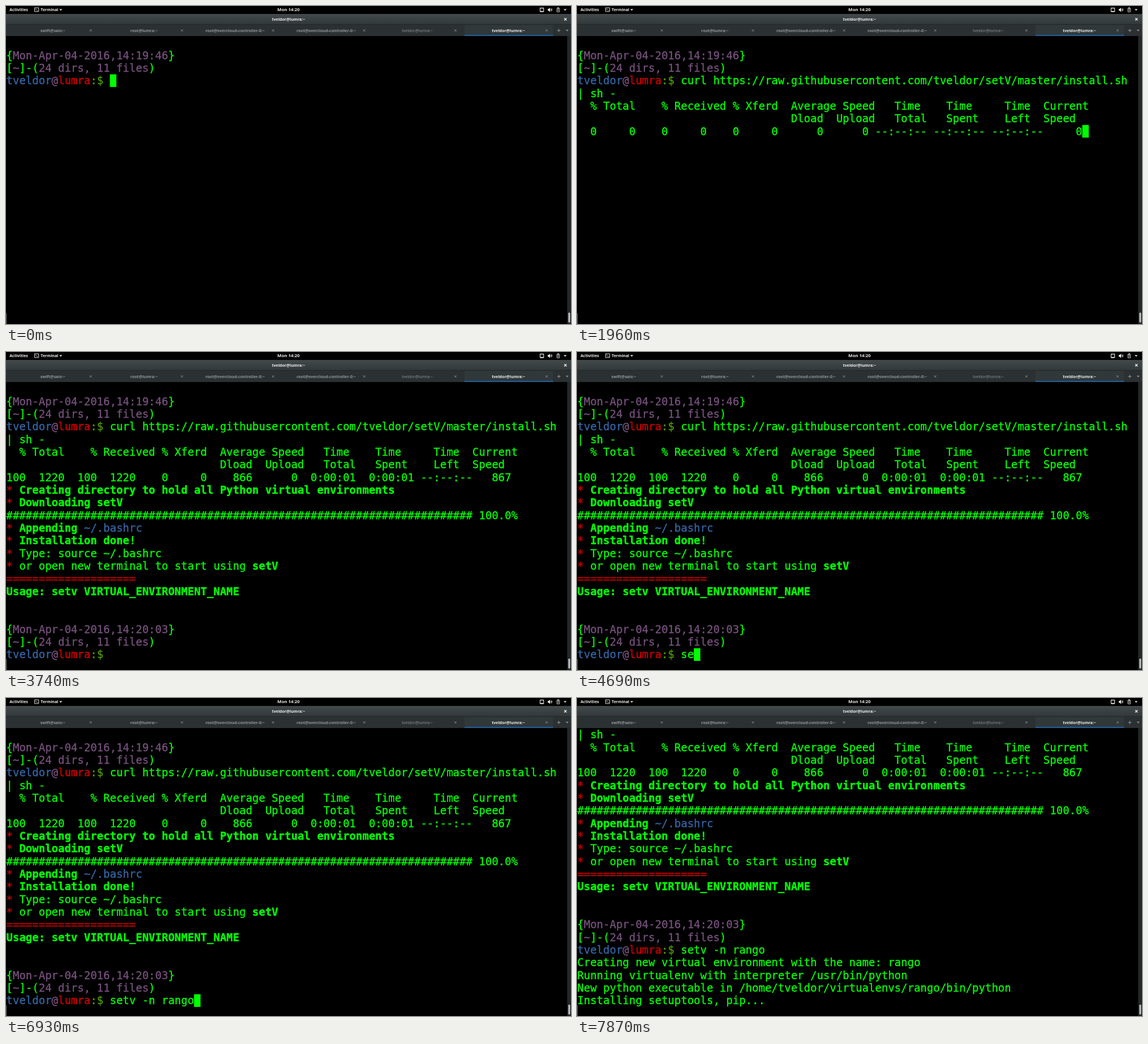
Animation, 998 px wide and 561 px high, one loop 8 s. Source, as an HTML page with a canvas:

```html
<!DOCTYPE html>
<html lang="en">
<head>
<meta charset="utf-8">
<title>Terminal session</title>
<style>
  html, body { margin: 0; width: 100%; height: 100%; overflow: hidden; background: #000; }
  canvas { display: block; }
</style>
</head>
<body>
<canvas id="stage" width="998" height="561"></canvas>
<script>
const ctx = document.getElementById('stage').getContext('2d');

// Layout is in desktop pixels, scaled down to the stage.
const WIDTH = 1920, HEIGHT = 1080;
const SCALE_X = 998 / WIDTH, SCALE_Y = 561 / HEIGHT;
const CELL_W = 22, CELL_H = 43, LEFT = 1, TOP = 103, ROWS = 22, BASELINE = 34;
const LOOP = 8000;
const MONO = '36.54px "DejaVu Sans Mono", monospace';
const UI = '"Open Sans", "Noto Sans", sans-serif';

const USER = 'tveldor', HOST = 'lumra';
const TITLE = `${USER}@${HOST}:~`;

// Inline style codes: ^g green, ^G bold green, ^p purple, ^b blue, ^r red, ^d dark green.
const COLORS = { g: '#00ff00', G: '#00ff00', p: '#75507b', b: '#3465a4', r: '#cc0000', d: '#4e9a06' };

const prompt = time => [
  '',
  `^g{^pMon-Apr-04-2016,${time}^g}`,
  '^g[^p~^g]-(^p24 dirs, 11 files^g)',
  `^b${USER}^p@^r${HOST}^d:$^g `
];
const item = text => '^r*' + text;

const first = prompt('14:19:46');
const command = [
  ...first.slice(0, 3),
  first[3] + `curl https://raw.githubusercontent.com/${USER}/setV/master/install.sh`,
  '| sh -'
];
const header = [
  ...command,
  '  % Total    % Received % Xferd  Average Speed   Time    Time     Time  Current',
  '                                 Dload  Upload   Total   Spent    Left  Speed'
];
const waiting = [
  ...header,
  '  0     0    0     0    0     0      0      0 --:--:-- --:--:-- --:--:--     0'
];
const download = [
  ...header,
  '100  1220  100  1220    0     0    866      0  0:00:01  0:00:01 --:--:--   867',
  item('^G Creating directory to hold all Python virtual environments'),
  item('^G Downloading setV')
];
const installed = [
  ...download,
  '#'.repeat(72) + ' 100.0%',
  item('^G Appending ^b~/.bashrc'),
  item('^G Installation done!'),
  item('^g Type: source ~/.bashrc'),
  item('^g or open new terminal to start using ^GsetV'),
  '^r' + '='.repeat(20),
  '^GUsage: setv VIRTUAL_ENVIRONMENT_NAME',
  '',
  ...prompt('14:20:03')
];
const typed = 'setv -n rango';
const keyTimes = [4450, 4690, 4820, 4930, 5030, 5420, 5690, 5890, 6220, 6470, 6600, 6820, 6930];
const withTyped = n => [...installed.slice(0, -1), installed.at(-1) + typed.slice(0, n)];
const creating = [...withTyped(typed.length), 'Creating new virtual environment with the name: rango'];
const running = [...creating, 'Running virtualenv with interpreter /usr/bin/python'];
const finishing = [
  ...running,
  `New python executable in /home/${USER}/virtualenvs/rango/bin/python`,
  'Installing setuptools, pip...'
];

const screens = [
  [0, first], [50, command], [820, waiting], [2190, [...download, '']], [3500, installed],
  ...keyTimes.map((at, i) => [at, withTyped(i + 1)]),
  [7340, [...creating, '']], [7470, [...running, '']], [7520, finishing]
];
const cursorHidden = [[350, 770], [1360, 1960], [2550, 3150], [3740, 4340], [7870, LOOP]];

function box(x, y, w, h, color) {
  ctx.fillStyle = color;
  ctx.fillRect(x, y, w, h);
}

function label(text, x, y, { color = '#eeeeec', weight = 700, align = 'center', size = 13.5 } = {}) {
  ctx.font = `${weight} ${size}px ${UI}`;
  ctx.textAlign = align;
  ctx.fillStyle = color;
  ctx.fillText(text, x, y);
}

function stroke(color, width, ...paths) {
  ctx.strokeStyle = color;
  ctx.lineWidth = width;
  ctx.beginPath();
  for (const [start, ...rest] of paths) {
    ctx.moveTo(...start);
    rest.forEach(p => ctx.lineTo(...p));
  }
  ctx.stroke();
}

function shape(color, ...points) {
  ctx.fillStyle = color;
  ctx.beginPath();
  points.forEach(p => ctx.lineTo(...p));
  ctx.fill();
}

const cross = (x, y, r, color, width) =>
  stroke(color, width, [[x - r, y - r], [x + r, y + r]], [[x - r, y + r], [x + r, y - r]]);
const arrow = (x, y, color) => shape(color, [x - 5, y - 2.5], [x + 5, y - 2.5], [x, y + 3]);

function drawTopBar() {
  const white = '#eeeeec';
  label('Activities', 12, 18, { align: 'left' });
  ctx.strokeStyle = white;
  ctx.lineWidth = 1.8;
  ctx.strokeRect(97, 6, 14, 13);
  stroke(white, 1.4, [[100, 9], [103, 11.5], [100, 14]], [[104, 15], [108, 15]]);
  label('Terminal', 118, 18, { align: 'left' });
  arrow(186, 13, white);
  label('Mon 14:20', 960, 18, { size: 15 });

  ctx.strokeStyle = white;
  ctx.lineWidth = 2;
  ctx.strokeRect(1815, 7, 12, 12);
  box(1817, 17, 8, 3, white);
  shape(white, [1841, 10], [1844, 10], [1849, 6], [1849, 20], [1844, 16], [1841, 16]);
  for (const r of [4, 7]) {
    ctx.strokeStyle = r === 4 ? white : '#888';
    ctx.beginPath();
    ctx.arc(1849, 13, r, -0.9, 0.9);
    ctx.stroke();
  }
  ctx.strokeStyle = white;
  ctx.lineWidth = 1.6;
  ctx.strokeRect(1872, 8, 9, 12);
  box(1874, 5, 5, 3, white);
  shape(white, [1877, 9], [1874, 14], [1876, 14], [1875, 19], [1879, 13], [1877, 13]);
  arrow(1900, 13, white);
}

function drawWindowFrame() {
  const bar = ctx.createLinearGradient(0, 27, 0, 63);
  bar.addColorStop(0, '#434a4b');
  bar.addColorStop(1, '#32383a');
  box(0, 27, WIDTH, 36, bar);
  label(TITLE, 960, 50);
  cross(1901, 45, 4, '#eeeeec', 2.4);

  box(0, 63, WIDTH, 39, '#2b3133');
  box(0, 62, WIDTH, 1.5, '#222728');
  box(1558, 64, 301, 38, '#31383a');
  box(1558, 98, 301, 4, '#215d9c');
  const remote = 'root@overcloud-controller-0:~';
  const tabs = ['swift@saio:~', `root@${HOST}:~`, remote, remote, TITLE, TITLE];
  tabs.forEach((name, i) => {
    const active = i === 5;
    const color = active ? '#eeeeec' : '#929595';
    label(name, 159 + i * 309.7, 88, { color, weight: i === 4 ? 400 : 700 });
    cross(288 + i * 309.8, 83, 3.5, '#8b8f8f', 1.8);
  });
  stroke('#8b8f8f', 2, [[1873, 83], [1884, 83]], [[1878.5, 77.5], [1878.5, 88.5]]);
  arrow(1907, 83, '#8b8f8f');

  box(1907, 102, 13, HEIGHT - 102, '#22282a');
  ctx.fillStyle = '#c4c6c5';
  ctx.beginPath();
  ctx.roundRect(1911, 1041, 6, 34, 3);
  ctx.fill();
  box(0, 1043, 2.5, 37, '#555753');
}

// Draws one row and returns its length in cells.
function drawRow(text, row) {
  const y = TOP + row * CELL_H + BASELINE;
  const parts = ('^g' + text).split(/\^(.)/);
  let col = 0;
  // A thin outline gives the letters the weight of hinted stems.
  ctx.lineWidth = 0.7;
  for (let i = 1; i < parts.length; i += 2) {
    const style = parts[i];
    ctx.font = (style === 'G' ? 'bold ' : '') + MONO;
    ctx.fillStyle = ctx.strokeStyle = COLORS[style];
    for (const ch of parts[i + 1]) {
      const x = LEFT + col++ * CELL_W;
      if (ch === ' ') continue;
      ctx.fillText(ch, x, y);
      ctx.strokeText(ch, x, y);
    }
  }
  return col;
}

function drawTerminal(t) {
  const lines = screens.findLast(([at]) => at <= t)[1].slice(-ROWS);
  ctx.textAlign = 'left';
  ctx.lineJoin = 'round';
  let col = 0;
  lines.forEach((text, row) => { col = drawRow(text, row); });
  if (!cursorHidden.some(([from, to]) => t >= from && t < to)) {
    box(LEFT + col * CELL_W, TOP + (lines.length - 1) * CELL_H, CELL_W, CELL_H, COLORS.g);
  }
}

function frame() {
  const t = performance.now() % LOOP;
  ctx.setTransform(SCALE_X, 0, 0, SCALE_Y, 0, 0);
  box(0, 0, WIDTH, HEIGHT, '#000');
  drawTopBar();
  drawWindowFrame();
  drawTerminal(t);
  requestAnimationFrame(frame);
}
frame();
</script>
</body>
</html>
```
